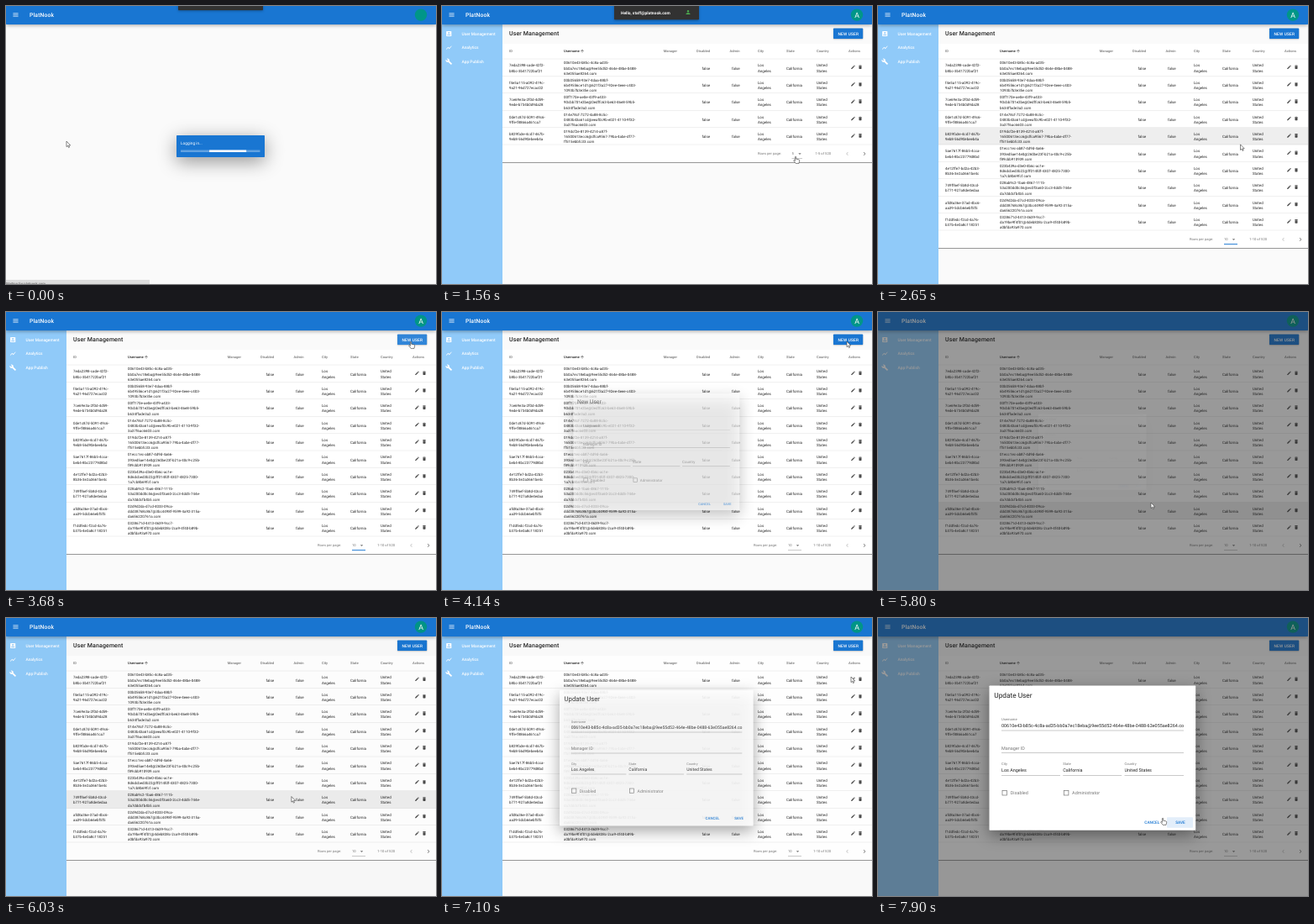
Recreate the animation shown at these times as an HTML page with a canvas. Size 512 px wide and 331 px high, loop 7.99 s.

```html
<!DOCTYPE html>
<html lang="en">
<head>
<meta charset="utf-8">
<title>User Management</title>
<style>
html, body { margin: 0; height: 100%; overflow: hidden; background: #fafafa; }
canvas { display: block; width: 100vw; height: 100vh; }
</style>
</head>
<body>
<canvas id="stage" width="512" height="331"></canvas>
<script>
const ctx = document.getElementById('stage').getContext('2d');
const LOOP = 7990, BRAND = 'PlatNook';
const BLUE = '#1976d2', DARK = 'rgba(0,0,0,.87)', GREY = 'rgba(0,0,0,.54)', LINE = 'rgba(0,0,0,.12)';
const ROW_TOP = 63.3, ROW_H = 20.4;

// Moments of the story, in ms
const T = { login: 120, page: 240, rows: 400, snackOut: 2000, menuOpen: 1620, menuClose: 2400, tenRows: 2500 };
const DIALOGS = [
  { title: 'New User', open: 4060, close: 5610 },
  { title: 'Update User', open: 6950, close: Infinity, filled: true }
];

const icons = {
  menu: 'M3 18h18v-2H3zm0-5h18v-2H3zM3 6v2h18V6z',
  users: 'M3 5v14a2 2 0 0 0 2 2h14a2 2 0 0 0 2-2V5a2 2 0 0 0-2-2H5a2 2 0 0 0-2 2zm12 4a3 3 0 1 1-6 0 3 3 0 0 1 6 0zm-9 8c0-2 4-3.1 6-3.1s6 1.1 6 3.1v1H6z',
  chart: 'M3.5 18.5l6-6 4 4L22 6.9l-1.4-1.4-7.1 8-4-4L2 17z',
  wrench: 'M22.7 19l-9.1-9.1c.9-2.3.4-5-1.5-6.9-2-2-5-2.4-7.4-1.3L9 6 6 9 1.6 4.7C.4 7.1.9 10.1 2.9 12.1c1.9 1.9 4.6 2.4 6.9 1.5l9.1 9.1c.4.4 1 .4 1.4 0l2.3-2.3c.5-.4.5-1.1.1-1.4z',
  edit: 'M3 17.25V21h3.75L17.8 9.94l-3.75-3.75zM20.7 7.04a1 1 0 0 0 0-1.41l-2.34-2.34a1 1 0 0 0-1.41 0l-1.83 1.83 3.75 3.75z',
  trash: 'M6 19c0 1.1.9 2 2 2h8c1.1 0 2-.9 2-2V7H6zM19 4h-3.5l-1-1h-5l-1 1H5v2h14z',
  person: 'M12 12a4 4 0 1 0 0-8 4 4 0 0 0 0 8zm0 2c-2.7 0-8 1.3-8 4v2h16v-2c0-2.7-5.3-4-8-4z',
  up: 'M4 12l1.4 1.4L11 7.8V20h2V7.8l5.6 5.6L20 12l-8-8z',
  left: 'M15.4 7.4L14 6l-6 6 6 6 1.4-1.4L10.8 12z',
  right: 'M10 6L8.6 7.4l4.6 4.6-4.6 4.6L10 18l6-6z',
  caret: 'M7 10l5 5 5-5z'
};
for (const name in icons) icons[name] = new Path2D(icons[name]);
const arrowShape = new Path2D('M0 0V6.6L1.5 5.3 2.6 7.6 3.6 7.1 2.6 4.9H4.7z');
const handShape = new Path2D('M-.6.6Q0-.4.7.6V3.2L4 3.9Q4.8 4.2 4.7 5.2L4 8.4H.2L-2.2 5.4Q-2.3 4.3-1.4 4.6L-.6 5.4z');

let seed = 7;
const random = () => (seed = seed * 16807 % 2147483647) / 2147483647;
const hex = n => Array.from({ length: n }, () => '0123456789abcdef'[random() * 16 | 0]).join('');
const ids = [
  '7eda2398-cade-42f2-b8bc-3b41722baf21', 'f4e5a115-a092-419c-9a21-96d727ecac02',
  '7ce69e3a-2f0d-4d59-9ede-b734b0d9da28', '0de1c87d-5091-49c6-9ffe-f8866a461ca7',
  'b829fa3e-4cd7-467b-9eb8-56d90ebeeb4a', '5ae7617f-86b5-4cca-beb4-8bc23779d8bd',
  '4e12ffe7-bd2a-42b3-8b36-3e2a3661be4c', '749ff6ef-5b8d-43cd-b771-927a8de4edaa',
  'afd8a36e-37ad-4bc6-aa39-5dcb66ebf5f5', 'f1ddfedc-f2cd-4a76-b37b-4e0a8c118251'
];
const users = ids.map((id, i) => ({
  id: [id.slice(0, 19), id.slice(19)],
  name: [
    `${(97 + i * 79).toString(16).padStart(4, '0')}${hex(4)}-${hex(4)}-4${hex(3)}-${hex(4)}-`,
    `${hex(12)}@${hex(8)}-${hex(4)}-4${hex(3)}-${hex(4)}-`,
    `${hex(12)}.com`
  ]
}));

const clamp = v => Math.max(0, Math.min(1, v));
const easeOut = v => 1 - (1 - clamp(v)) ** 3;
const smooth = v => (v = clamp(v)) * v * (3 - 2 * v);
const progress = (t, start, length = 300) => easeOut((t - start) / length);

function rect(x, y, w, h, color, radius = 0) {
  ctx.fillStyle = color;
  ctx.beginPath();
  ctx.roundRect(x, y, w, h, radius);
  ctx.fill();
}
function raised(x, y, w, h, color, blur, drop, shade) {
  ctx.save();
  ctx.shadowColor = `rgba(0,0,0,${shade})`;
  ctx.shadowBlur = blur;
  ctx.shadowOffsetY = drop;
  rect(x, y, w, h, color, .7);
  ctx.restore();
}
// y is the middle of the capitals
function text(str, x, y, size, color = DARK, weight = 400, align = 'left', spacing = 0) {
  ctx.font = `${weight} ${size}px Roboto, sans-serif`;
  ctx.textRendering = 'geometricPrecision';
  ctx.letterSpacing = spacing + 'px';
  ctx.textAlign = align;
  ctx.fillStyle = color;
  ctx.fillText(str, x, y + size * .35);
}
function lines(list, x, y, size = 4.42) {
  list.forEach((s, i) => text(s, x, y + (i - (list.length - 1) / 2) * 6.2, size));
}
function icon(name, cx, cy, size, color) {
  ctx.save();
  ctx.translate(cx - size / 2, cy - size / 2);
  ctx.scale(size / 24, size / 24);
  ctx.fillStyle = color;
  ctx.fill(icons[name], 'evenodd');
  ctx.restore();
}
// Fades and scales a layer about its centre
function layer(cx, cy, shown, draw) {
  if (shown <= 0) return;
  const scale = .5 + shown / 2;
  ctx.save();
  ctx.globalAlpha = shown;
  ctx.translate(cx, cy);
  ctx.scale(scale, scale);
  ctx.translate(-cx, -cy);
  draw();
  ctx.restore();
}

const track = [
  [0, 72, 161], [700, 72, 161], [1440, 421, 179], [1680, 421, 179], [2100, 421, 192], [2450, 421, 192],
  [3210, 482, 35], [4260, 482, 35], [4740, 289, 197], [5010, 289, 197], [5400, 325, 240], [5620, 325, 240],
  [5780, 325, 227], [5900, 325, 227], [6600, 487, 70], [7280, 487, 70], [7880, 339, 238], [LOOP, 339, 238]
];
const handTimes = [[1380, 2460], [3100, 4120], [5320, 5640], [6540, 7000], [7760, LOOP]];
function pointer(t) {
  const i = track.findIndex(k => k[0] > t);
  const [t0, x0, y0] = track[i - 1], [t1, x1, y1] = track[i];
  const p = smooth((t - t0) / (t1 - t0));
  return { x: x0 + (x1 - x0) * p, y: y0 + (y1 - y0) * p, hand: handTimes.some(([a, b]) => t >= a && t < b) };
}
function drawPointer({ x, y, hand }) {
  ctx.save();
  ctx.translate(x, y);
  ctx.fillStyle = '#fff';
  ctx.strokeStyle = '#444';
  ctx.lineWidth = .65;
  const shape = hand ? handShape : arrowShape;
  ctx.fill(shape);
  ctx.stroke(shape);
  ctx.restore();
}

function drawToolbar(t) {
  raised(0, -5, 512, 26.9, BLUE, 4, 1, .35);
  icon('menu', 11.5, 10.5, 8.2, '#fff');
  text(BRAND, 28, 10.7, 6.8, '#fff', 500, 'left', .13);
  ctx.fillStyle = '#009688';
  ctx.beginPath();
  ctx.arc(494, 10.6, 7.2, 0, 7);
  ctx.fill();
  if (t >= T.page) text('A', 494, 10.7, 8.8, '#fff', 400, 'center');
}

function drawSidebar(t) {
  ctx.save();
  ctx.translate(-72 * (1 - progress(t, T.page - 60, 200)), 0);
  rect(0, 21, 72, 310, '#90caf9');
  [['users', 'User Management'], ['chart', 'Analytics'], ['wrench', 'App Publish']].forEach(([name, label], i) => {
    icon(name, 8.2, 33 + i * 16.6, 8.2, '#fff');
    text(label, 23.5, 33 + i * 16.6, 4.9, '#fff', 500);
  });
  ctx.restore();
}

function drawTable(t, mouse, blocked) {
  const count = t < T.rows ? 0 : t < T.tenRows ? 5 : 10;
  const bottom = ROW_TOP + Math.max(count, 1) * ROW_H;
  const cardEnd = Math.floor(bottom + 21);
  rect(72, 45, 440, cardEnd - 45, '#fff');
  rect(72, cardEnd, 440, 1, 'rgba(0,0,0,.4)');
  text('User Management', 80, 33, 7, DARK, 500, 'left', .13);
  const hot = !blocked && mouse.x > 466 && mouse.x < 501 && mouse.y > 26 && mouse.y < 40;
  raised(466, 26.6, 35.2, 12.3, hot ? '#3085d8' : BLUE, 1.5, .7, .3);
  text('NEW USER', 483.8, 33, 4.8, '#fff', 500, 'center', .18);

  const head = (s, x, align) => text(s, x, 54, 4.1, GREY, 500, align);
  head('ID', 80);
  text('Username', 145, 54, 4.1, DARK, 500);
  icon('up', 167, 53.8, 5.4, DARK);
  head('Manager', 280, 'right');
  head('Disabled', 319, 'right');
  head('Admin', 354.5, 'right');
  head('City', 376);
  head('State', 410);
  head('Country', 446);
  head('Actions', 484);
  rect(72, ROW_TOP - .5, 440, .5, LINE);

  users.slice(0, count).forEach((user, i) => {
    const top = ROW_TOP + i * ROW_H, y = top + 10.7;
    if (!blocked && mouse.x > 72 && mouse.y >= top && mouse.y < top + ROW_H) rect(72, top, 440, ROW_H, '#eee');
    rect(72, top + ROW_H - .5, 440, .5, LINE);
    lines(user.id, 80, y);
    lines(user.name, 145, y);
    text('false', 319, y, 4.42, DARK, 400, 'right');
    text('false', 354.5, y, 4.42, DARK, 400, 'right');
    lines(['Los', 'Angeles'], 376, y);
    text('California', 410, y, 4.42);
    lines(['United', 'States'], 446, y);
    icon('edit', 489.5, y - 1.2, 6.1, 'rgba(0,0,0,.7)');
    icon('trash', 498, y - 1.2, 6.1, 'rgba(0,0,0,.7)');
  });
  if (count) drawPager(t, count, bottom + 10.6);
}

function drawPager(t, count, y) {
  const five = count === 5, focused = t > T.menuOpen && t < DIALOGS[0].open;
  text('Rows per page:', five ? 376 : 371, y, 4.1, GREY);
  text(count, five ? 416.5 : 412, y, 4.1, GREY);
  icon('caret', five ? 426 : 423.5, y, 8.2, GREY);
  rect(five ? 416.5 : 412, y + 5.1, five ? 12.5 : 16, focused ? .9 : .5, focused ? BLUE : 'rgba(0,0,0,.42)');
  text(`1-${count} of 520`, 463, y, 4.1, GREY, 400, 'right');
  icon('left', 482.5, y, 8.2, 'rgba(0,0,0,.26)');
  icon('right', 503, y, 8.2, GREY);
}

function drawMenu(t, mouse) {
  const shown = t < T.menuClose ? progress(t, T.menuOpen, 200) : 1 - progress(t, T.menuClose, 180);
  layer(425, 168, shown, () => {
    raised(412, 167.5, 26, 70.5, '#fff', 6, 2, .35);
    ['5', '10', '25', 'All'].forEach((label, i) => {
      const top = 170.2 + i * 16.3;
      if (mouse.y >= top && mouse.y < top + 16.3) rect(412, top, 26, 16.3, '#f0f0f0');
      text(label, 417.5, top + 8.1, 4.8, i ? DARK : BLUE);
    });
  });
}

function drawSnackbar(t) {
  if (t > T.snackOut + 300) return;
  const y = -11.3 * (1 - progress(t, 60)) - 18 * progress(t, T.snackOut);
  raised(205, y - 4, 101, 20.3, '#323232', 3, 1, .3);
  text(`Hello, staff@${BRAND.toLowerCase()}.com`, 213, y + 7.8, 4.9, '#fff', 700);
  icon('person', 293, y + 7.6, 7.5, '#4caf50');
}

function drawLogin(t) {
  layer(255.5, 167, 1 - progress(t, T.login), () => {
    raised(203, 154, 105, 26, BLUE, 22, 5, .42);
    text('Logging in...', 208, 163, 4.75, '#fff');
    rect(208, 171.6, 94.5, 2.4, 'rgba(255,255,255,.32)');
    const x = Math.min(242 + t * .12, 302);
    rect(x, 171.6, Math.min(44, 302.5 - x), 2.4, '#fff');
  });
  if (t < 160) {
    rect(0, 326, 171, 6, '#dcdcdc');
    text(`Waiting for ${BRAND.toLowerCase()}.com...`, 0, 330.3, 4.2, '#555');
  }
}

function drawField(label, value, x, y, width) {
  if (value) {
    text(label, x, y - 7.6, 4.1, GREY);
    ctx.save();
    ctx.beginPath();
    ctx.rect(x, y - 5, width, 10);
    ctx.clip();
    text(value, x, y, 5.44);
    ctx.restore();
  } else {
    text(label, x, y, 5.44, GREY);
  }
  rect(x, y + 5.6, width, .5, 'rgba(0,0,0,.42)');
}

function drawDialog(t, { title, open, close, filled }) {
  const shown = t < close ? progress(t, open) : 1 - progress(t, close);
  layer(255.3, 166.5, shown, () => {
    raised(132.5, 80.5, 245.7, 172.3, '#fff', 18, 6, .4);
    text(title, 138.3, 91.7, 8.3);
    const value = s => filled ? s : '';
    drawField('Username', value(users[0].name.join('')), 147, 128.2, 217);
    drawField('Manager ID', '', 147, 154.8, 217);
    drawField('City', value('Los Angeles'), 147, 181.4, 70);
    drawField('State', value('California'), 220.2, 181.4, 70);
    drawField('Country', value('United States'), 293.5, 181.4, 70.5);
    [['Disabled', 148], ['Administrator', 221.3]].forEach(([label, x]) => {
      ctx.strokeStyle = GREY;
      ctx.lineWidth = .7;
      ctx.strokeRect(x, 205.4, 5.6, 5.6);
      text(label, x + 9.8, 208.3, 5.44, GREY);
    });
    if (filled && t > 7740) rect(344, 237.3, 31, 12.4, 'rgba(25,118,210,.12)', .7);
    if (!filled && t > 5380) rect(312, 237.3, 28.5, 12.4, 'rgba(25,118,210,.12)', .7);
    text('CANCEL', 326.3, 243.5, 4.76, BLUE, 500, 'center');
    text('SAVE', 360, 243.5, 4.76, BLUE, 500, 'center');
  });
}

function draw(t) {
  const mouse = pointer(t);
  const blocked = DIALOGS.some(d => t >= d.open && t < d.close + 150);
  rect(0, 0, 512, 331, '#fafafa');
  if (t >= T.page) drawTable(t, mouse, blocked);
  if (t >= T.page - 60) drawSidebar(t);
  drawToolbar(t);
  drawSnackbar(t);
  if (t < 500) drawLogin(t);
  if (t >= T.menuOpen && t < T.menuClose + 180) drawMenu(t, mouse);
  for (const dialog of DIALOGS) {
    const dim = progress(t, dialog.open + 150) - progress(t, dialog.close + 210);
    if (dim > 0) rect(0, 0, 512, 331, `rgba(33,33,33,${.46 * dim})`);
    drawDialog(t, dialog);
  }
  drawPointer(mouse);
}

const begin = performance.now();
function tick() {
  draw((performance.now() - begin) % LOOP);
  requestAnimationFrame(tick);
}
tick();
</script>
</body>
</html>
```
